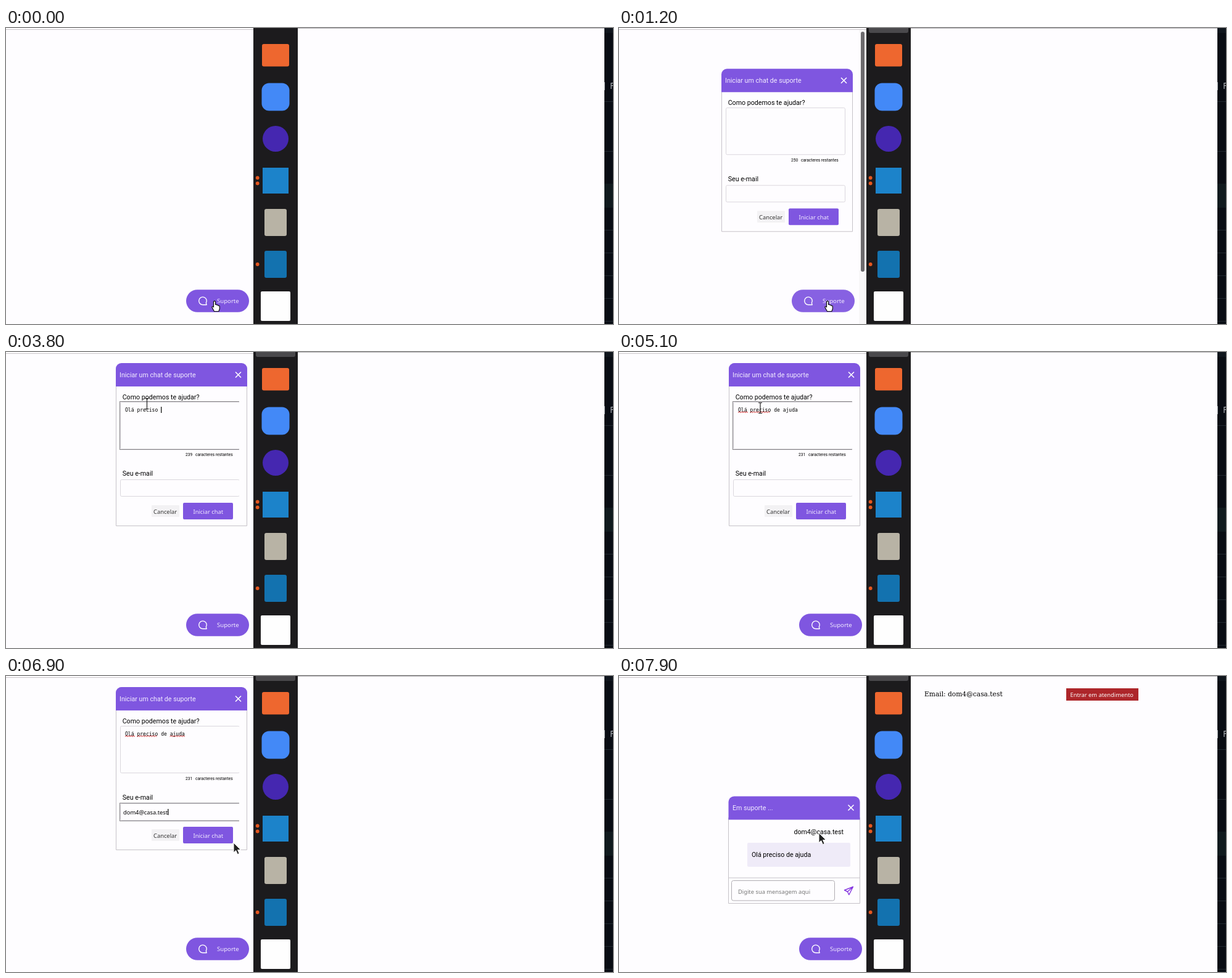
Write an HTML page that moves like this. It is 984x481 px and loops after 8 s.

```html
<!DOCTYPE html>
<html lang="pt">
<head>
<meta charset="utf-8">
<title>Chat de suporte</title>
<style>
  html, body { margin: 0; width: 100%; height: 100%; overflow: hidden; background: #fefdff; }
  svg { display: block; width: 984px; height: 481px; }
  text { white-space: pre; }
  .ui { font: 10.67px Roboto, sans-serif; }
  .small { font: 6.67px Roboto, sans-serif; }
  .control { font: 9.33px "Noto Sans", sans-serif; }
  .mono { font: 8.05px "DejaVu Sans Mono", monospace; }
  .serif { font: 10.67px "DejaVu Serif", serif; }
  .purple { fill: #7f56e0; }
  .light { fill: #f3ecff; }
  .line { fill: none; stroke: #c6c2c8; }
  .field { fill: none; stroke: #dad7dd; }
  .cross { fill: none; stroke: #fff; stroke-width: 1.6; }
  .squiggle { fill: none; stroke: #d02020; }
</style>
</head>
<body>
<svg viewBox="0 0 984 481">
  <defs>
    <clipPath id="fieldClip"><rect id="fieldClipBox" x="180" y="60" height="190"/></clipPath>
    <path id="header" class="purple" d="M0 38V9a9 9 0 0 1 9-9H204a9 9 0 0 1 9 9V38z"/>
    <path id="cross" class="cross" d="M-4.500-4.500l9 9m0-9l-9 9"/>
  </defs>

  <rect width="984" height="481" fill="#fefdff"/>
  <path d="M0 2.500H401" stroke="#c9c5c9"/>
  <g id="scrollbar">
    <rect x="389" y="3" width="12" height="478" fill="#f8f7f8"/>
    <rect x="392" y="6" width="6" height="390" rx="3" fill="#6c6a6d"/>
  </g>

  <g id="form">
    <path class="line" d="M178.500 50V282.500H390.500V50"/>
    <use href="#header" x="178" y="18"/>
    <text class="ui light" x="184" y="41">Iniciar um chat de suporte</text>
    <use href="#cross" x="376.500" y="37"/>
    <text class="ui" x="188.700" y="77">Como podemos te ajudar?</text>
    <g clip-path="url(#fieldClip)">
      <rect class="field" x="185.500" y="81.500" width="193" height="76" rx="2"/>
      <rect class="field" x="185.500" y="207.500" width="193" height="27" rx="2"/>
      <rect id="focusRing" x="184.500" width="195" fill="none" stroke="#858386"/>
    </g>
    <text class="mono" id="message" x="193" y="97"></text>
    <g id="squiggles"></g>
    <text class="small" id="counter" x="291" y="169"></text>
    <text class="small" x="307" y="169">caracteres restantes</text>
    <text class="ui" x="188.700" y="201">Seu e-mail</text>
    <text class="control" id="email" x="190" y="225"></text>
    <rect id="caret" width="1.200" height="10"/>
    <rect x="236" y="249" width="45" height="19" rx="1" fill="#f3f2f4"/>
    <text class="control" x="239" y="263" fill="#333">Cancelar</text>
    <rect class="purple" x="287" y="245" width="81" height="27" rx="2"/>
    <text class="control light" x="303.500" y="263">Iniciar chat</text>
  </g>

  <g id="chat">
    <path class="line" d="M177.500 230V369.500H390.500V230M177.500 328H390.500"/>
    <use href="#header" x="177.500" y="195.500"/>
    <text class="ui light" x="184" y="218">Em suporte ...</text>
    <use href="#cross" x="376" y="214"/>
    <text class="ui" id="sender" x="364" y="257" text-anchor="end"></text>
    <rect x="208" y="271" width="167" height="39" rx="2" fill="#efebf8"/>
    <text class="ui" id="bubble" x="215" y="294"></text>
    <rect x="182.500" y="332.500" width="167" height="32.500" rx="3" fill="none" stroke="#b0adb2"/>
    <text class="control" x="193" y="353.500" fill="#777">Digite sua mensagem aqui</text>
    <path d="M379.500 342.500L365.500 348l5 2.500 2.300 5zm0 0l-9 8" fill="none" stroke="#8434e0" stroke-width="1.400" stroke-linejoin="round"/>
  </g>

  <g id="support">
    <rect class="purple" x="292" y="425.200" width="102" height="36.600" rx="18.300"/>
    <path d="M325.200 449.800H319a6.300 6.300 0 1 1 5.300-2.900z" fill="none" stroke="#fff" stroke-width="1.400" stroke-linejoin="round"/>
    <text class="control light" x="342" y="447" style="font-size:9.600px">Suporte</text>
  </g>

  <rect x="401" width="72" height="481" fill="#1c1b1d"/>
  <path id="dockTile" d="M405 0H469V5a3 3 0 0 1-3 3H408a3 3 0 0 1-3-3z" fill="#4a494c"/>
  <rect x="415" y="26" width="44" height="36.500" rx="3" fill="#ee672f"/>
  <rect x="414.500" y="89.500" width="45" height="45" rx="12" fill="#4389f7"/>
  <circle cx="437" cy="180" r="21" fill="#4527b0"/>
  <rect x="416" y="227" width="42" height="42" fill="#1c83ca"/>
  <rect x="419" y="294" width="36" height="44" rx="3" fill="#b8b3a5"/>
  <rect x="419" y="362" width="36" height="44" rx="3" fill="#1372af"/>
  <rect x="413" y="428" width="48" height="48" rx="2" fill="#fefefe"/>
  <g fill="#e5571f">
    <circle cx="407.700" cy="243.500" r="2.900"/>
    <circle cx="407.700" cy="252.500" r="2.900"/>
    <circle cx="407.700" cy="384" r="2.900"/>
  </g>

  <path d="M473 .5H970" stroke="#b4b1b4"/>
  <g id="ticket">
    <text class="serif" id="ticketEmail" x="495" y="33"></text>
    <rect x="725" y="20" width="117" height="20" fill="#ad262a"/>
    <text class="control" x="731.500" y="34" fill="#fff">Entrar em atendimento</text>
  </g>

  <rect x="970" width="14" height="481" fill="#090d14"/>
  <rect x="970" width="14" height="8" fill="#10161d"/>
  <rect x="970" y="253" width="14" height="39" fill="#101a1e"/>
  <path d="M970 119.500h14m-14 81h14m-14 128h14m-14 37h14m-14 37h14m-14 37h14m-14 37h14" stroke="#222a31"/>
  <path d="M970.500 88V101" stroke="#8b8f95"/>
  <text x="979" y="99" fill="#aeb3b8" style="font:14px 'Noto Sans',sans-serif">F</text>

  <g id="cursor" stroke-linejoin="round">
    <path id="hand" d="M-1.500 1.200q1.500-2 3 0V6q2-1 2.500.8 2-.6 2.300 1 2-.3 2 1.500V13l-1.500 4H-.5L-4 10.500q-.3-2 1.500-1.300l1 1z" fill="#fff" stroke="#111" stroke-width="1.200"/>
    <path id="arrow" d="M0 0V16l3.700-3.500 2.700 6.200 2.800-1.200-2.700-6H11.500z" fill="#222" stroke="#fff"/>
    <path id="beam" d="M-3-8.500H3M0-8.500V8.500M-3 8.500H3" fill="none" stroke="#222" stroke-width="1.200"/>
  </g>
</svg>

<script>
const LOOP = 8000, TICK = 100;
const MESSAGE = "Olá preciso de ajuda";
const EMAIL = "dom4@casa.test";
const CHAR = 4.846;

// [time, number of characters typed]
const TYPING = [[0, 0], [2400, 1], [2700, 2], [2800, 3], [2900, 4], [3100, 5], [3200, 6],
  [3400, 7], [3600, 8], [3700, 10], [3800, 12], [3900, 13], [4000, 14], [4100, 15],
  [4200, 16], [4300, 17], [4500, 18], [4700, 20]];

// [time, shape, x, y]
const POINTER = [[0, "hand", 338, 443.500], [1300, "arrow", 300, 270], [1400, "arrow", 262, 190],
  [1500, "beam", 235, 145], [1600, "beam", 221, 130], [1900, "none", 0, 0],
  [2100, "beam", 228.500, 84], [5100, "beam", 229, 91], [5500, "arrow", 190, 50],
  [5600, "arrow", 142, 120], [5700, "beam", 205, 220], [5800, "hand", 262, 252],
  [6000, "hand", 250, 250], [6100, "beam", 242.500, 241], [6300, "beam", 246, 226],
  [6500, "beam", 290, 225], [6600, "beam", 340, 232], [6700, "arrow", 372, 252],
  [6900, "arrow", 369, 271], [7000, "hand", 355, 262], [7200, "hand", 338, 259],
  [7400, "arrow", 324, 255]];

// [first character, length, time it is underlined]
const MISSPELLED = [[0, 3, 3900], [4, 7, 3900], [15, 5, 6500]];

const el = id => document.getElementById(id);
const at = (steps, t) => steps.findLast(step => step[0] <= t);
const show = (id, on) => el(id).style.display = on ? "" : "none";
const move = (id, x, y) => el(id).setAttribute("transform", `translate(${x} ${y})`);

el("sender").textContent = EMAIL;
el("bubble").textContent = MESSAGE;
el("ticketEmail").textContent = "Email: " + EMAIL;

const squiggles = MISSPELLED.map(([start, length, time]) => {
  const path = document.createElementNS("http://www.w3.org/2000/svg", "path");
  const waves = Math.round(length * CHAR / 4);
  path.setAttribute("class", "squiggle");
  path.setAttribute("d", `M${193 + start * CHAR} 98.500` + "l2-1.500 2 1.500".repeat(waves));
  el("squiggles").append(path);
  return { path, time };
});

function drawForm(t, shift) {
  const progress = Math.min(1, Math.max(0, (t - 500) / 1100));
  move("form", shift, 547 * (1 - progress) ** 2.4);
  show("form", t >= 500 && t < 7600);

  const typed = at(TYPING, t)[1];
  const onMessage = t >= 1800 && t < 6300;
  const onEmail = t >= 6300;
  el("message").textContent = MESSAGE.slice(0, typed);
  el("counter").textContent = 250 - Math.max(0, typed - 1);
  el("email").textContent = t >= 6500 ? EMAIL : "";
  show("focusRing", onMessage || onEmail);
  el("focusRing").setAttribute("y", onEmail ? 206.5 : 80.5);
  el("focusRing").setAttribute("height", onEmail ? 29 : 78);
  el("fieldClipBox").setAttribute("width", t < 1800 ? 205 : 198);
  squiggles.forEach(({ path, time }) => path.style.display = t >= time ? "" : "none");

  const emailWidth = t >= 6500 ? el("email").getComputedTextLength() : 0;
  show("caret", onEmail || onMessage && t < 5100);
  move("caret", onEmail ? 190 + emailWidth : 193 + typed * CHAR, onEmail ? 216 : 89);
}

function draw(t) {
  const scrolling = t >= 500 && t < 1300;
  const shift = scrolling ? -12 : 0;
  show("scrollbar", scrolling);
  show("dockTile", t >= 500);
  move("support", shift, 0);
  el("support").setAttribute("opacity", scrolling ? .93 : 1);
  drawForm(t, shift);

  show("chat", t >= 7600);
  move("chat", 0, 77 * Math.max(0, 7900 - t) / 300);
  show("ticket", t >= 7800);

  const [, shape, x, y] = at(POINTER, t);
  for (const id of ["hand", "arrow", "beam"]) show(id, id === shape);
  move("cursor", x, y);
}

const start = performance.now();
function frame() {
  const t = (performance.now() - start) % LOOP;
  draw(Math.floor(t / TICK) * TICK);
  requestAnimationFrame(frame);
}
frame();
</script>
</body>
</html>
```
